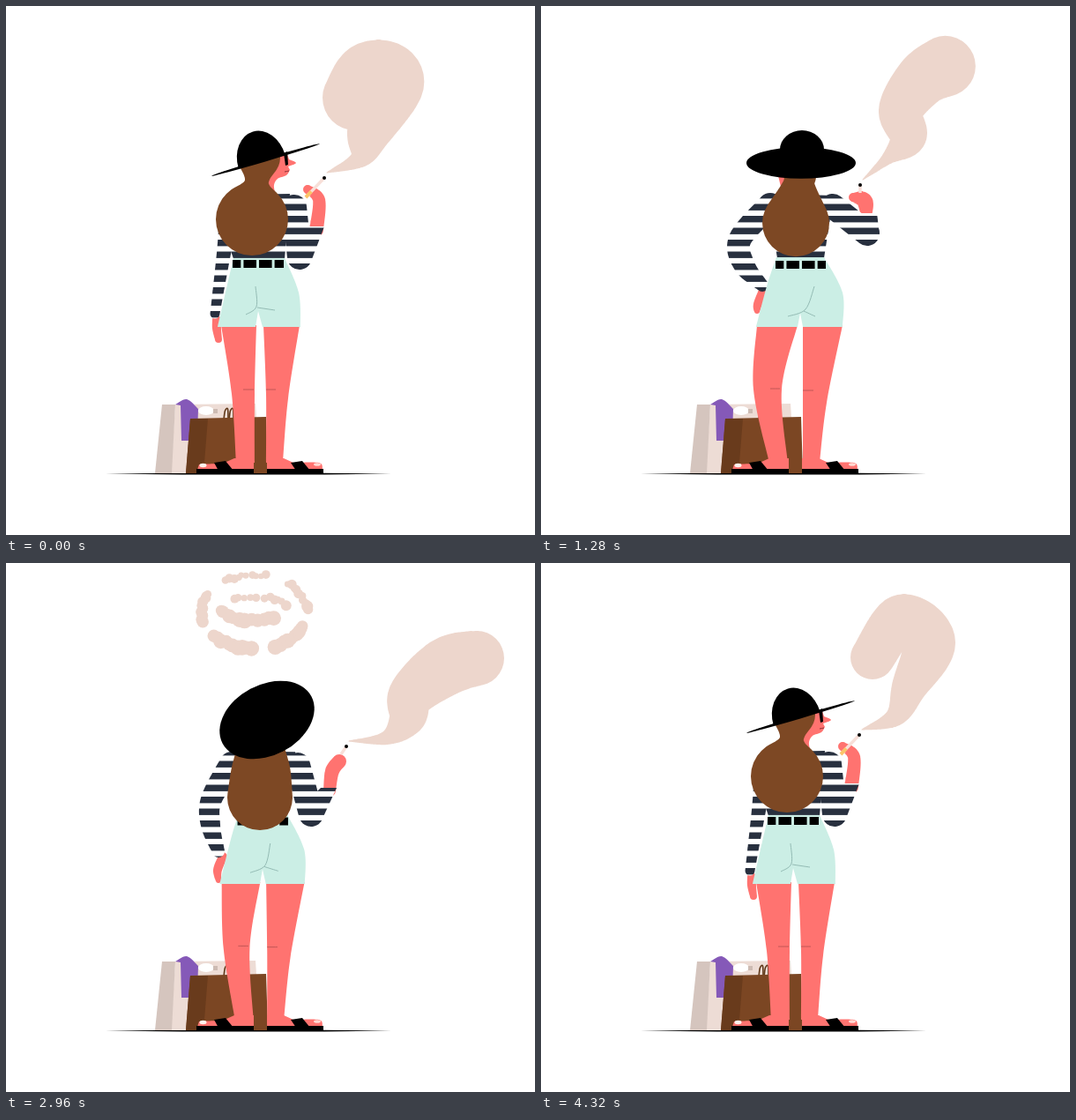
An HTML page with a canvas for the animation above (4400 ms loop, 600 px wide and 600 px high).

```html
<!DOCTYPE html>
<html lang="en">
<head>
<meta charset="utf-8">
<title>Woman smoking</title>
<style>
html, body { margin: 0; width: 100%; height: 100%; overflow: hidden; background: #fff; }
canvas { display: block; width: 600px; height: 600px; }
</style>
</head>
<body>
<canvas id="stage"></canvas>
<script>
const LOOP = 4400, STEP = 40;
const SKIN = '#ff7370', MINT = '#cbeee5', NAVY = '#28303f', HAIR = '#7d4824', SMOKE = '#edd6cc';

const dpr = window.devicePixelRatio || 1;
function setup(canvas) {
  canvas.width = canvas.height = 600 * dpr;
  const c = canvas.getContext('2d');
  c.scale(dpr, dpr);
  return c;
}
const g = setup(document.getElementById('stage'));
const cloth = setup(document.createElement('canvas'));

// "x y x y | x y" -> runs of points; a run is smooth, runs meet in corners
const parse = (s, dim = 2) => s.split('|').map(run => {
  const n = run.trim().split(/\s+/).map(Number);
  return Array.from({ length: n.length / dim }, (_, i) => n.slice(i * dim, (i + 1) * dim));
});
const mix = (a, b, u) => Array.isArray(a) ? a.map((v, i) => mix(v, b[i], u)) : a + (b - a) * u;
const poses = (o, dim) => Object.fromEntries(Object.entries(o).map(([k, s]) => [k, parse(s, dim)]));
// limbs, hair and smoke: one run of x, y, radius
const limb = o => poses(o, 3);
// A in profile, B from behind, C on the way back
const turn = (a, b) => {
  const p = poses({ A: a, B: b });
  p.C = mix(p.A, p.B, .62);
  return p;
};
const track = s => s.split(' ').map(k => ({ pose: k[0], t: +k.slice(1) }));
const smooth = u => u * u * (3 - 2 * u);
const linear = u => u;

function at(part, keys, t, ease = smooth) {
  const i = keys.findIndex(k => k.t > t);
  const a = keys[i - 1], b = keys[i];
  return mix(part[a.pose], part[b.pose], ease((t - a.t) / (b.t - a.t)));
}

// D inhales, E breathes out with the head back
const body = track('A0 A40 B560 B2560 C2960 A3320 A4400');
const head = track('A0 A40 B560 B1240 D1840 D1880 E2240 E2560 C2960 A3320 A4400');
const reach = track('A0 A40 B560 B640 D1080 D1880 E2240 E2560 C2960 A3320 A4400');
const drift = track('A0 S720 S1160 D1840 E2320 C2960 C3320 S3680 G4320 A4400');

const legL = turn('244 362 256 440 261 518 | 282 518 282 440 284 362', '245 362 241 435 259 518 | 280 518 273 435 291 362');
const legR = turn('292 362 295 440 295 518 | 314 518 320 445 333 362', '297 362 297 440 297 518 | 316 518 324 450 342 362');
const shorts = turn('258 286 254 303 240 364 | 283 364 | 286 346 | 291 364 | 334 364 332 325 316 286',
                    '267 285 256 318 244 364 | 291 364 | 294 348 | 297 364 | 342 364 342 325 321 285');
const crease = turn('283 318 284 341 272 350 | 285 342 305 345', '310 318 300 344 280 352 | 298 346 311 352');
const knees = turn('269 435 281 435 | 295 435 306 435', '260 434 271 434 | 297 436 309 436');
const belt = turn('257 292.5 315 292.5', '266 293.5 323 293.5');
const torso = turn('262 214 | 322 213 | 316 287 | 258 287 | 250 262', '256 213 | 332 215 | 321 286 | 268 286 | 262 250');
const faceShift = turn('0 0', '-24 -8');
const crown = turn('290 176 27.5 35', '296 163 25 22');

const armL = limb({
  A: '256 228 14 249 268 9 243 308 7 237 349 5.5',
  B: '260 226 14 226 264 13 230 293 12 251 317 7',
  C: '256 228 14 233 268 12 232 297 11 241 327 7' });
const handL = limb({
  A: '239 356 5 239 366 5 241 378 4',
  B: '254 318 5 246 338 5 245 346 3',
  C: '246 333 5 240 348 5 241 360 3' });
// shoulder, elbow, wrist
const armR = poses({
  A: '327 228 333 285 352 250',
  B: '333 230 341 285 358 252',
  C: '331 229 346 285 366 255',
  D: '331 227 370 258 372 235',
  E: '334 232 349 285 374 264' });
const handR = limb({
  A: '352 254 8 355 220 7 342 208 5',
  B: '358 255 7 360 218 8 349 210 5',
  C: '367 258 7 370 236 8 378 225 8',
  D: '369 239 6 367 221 9 354 217 5',
  E: '377 266 6 388 244 8 411 238 6' });
const cigarette = poses({ A: '340 217 361 195', B: '346 216 365 197', C: '380 217 386 208', D: '362 212 362 203', E: '414 236 425 235' });

const hair = limb({
  A: '287 172 24 284 203 14 279 242 41',
  B: '294 192 18 292 207 19 289 246 38',
  C: '289 220 29 289 240 34 288 266 37',
  D: '291 212 29 291 232 34 291 264 36',
  E: '295 232 31 294 260 36 293 283 37' });
// x, y, rx, ry, tilt
const brim = {
  A: [294.5, 174.5, 64, 1.7, -16.5], B: [295, 178, 62, 17.5, 0], C: [296, 178, 57, 40, -28],
  D: [294.5, 176.5, 61, 38, 1], E: [294, 177, 62, 52, 0] };

// spine from stem to head, starting beyond the cigarette tip
const smoke = limb({
  A: '402 172 11 412 142 25 436 88 38 414 80 40 396 104 37',
  C: '432 198 8 455 176 20 460 149 26 500 117 33 534 108 31',
  D: '390 190 5 404 170 13 413 128 30 414 96 39 414 74 41',
  E: '448 209 6 478 185 18 482 150 23 482 112 36 481 98 42',
  G: '402 174 11 418 140 20 440 90 30 408 63 27 376 107 25',
  S: '395 168 8 419 144 22 407 116 24 437 80 29 468 67 33' });

const puff = limb({
  S: '300 150 2 300 149 2 300 148 2',
  M: '300 126 7 290 103 9 286 82 13',
  L: '295 105 12 282 72 38 280 58 48' });
const puffTrack = track('S2160 M2320 L2720');

// the puff breaks into two broken rings of small bubbles
let seed = 7;
const random = () => (seed = seed * 16807 % 2147483647) / 2147483647;
const bubbles = [];
for (const [y, rx, ry, count, gaps] of [[54, 60, 42, 70, 5], [50, 38, 13, 34, 2]]) {
  for (let i = 0; i < count; i++) {
    const a = i / count * Math.PI * 2;
    if (Math.sin(a * gaps + 1) > .6) continue;
    bubbles.push([280 + rx * Math.cos(a) + random() * 3, y + ry * Math.sin(a) + random() * 3, 5 + 2 * Math.sin(a) + random() * 2]);
  }
}
const fade = { A: [2.2, .86], B: [1, 1], C: [0, 1.14] };
const fadeTrack = track('A2720 B2960 C3480');

function trace(c, runs, closed) {
  c.beginPath();
  runs.forEach((p, r) => {
    const n = p.length;
    const pt = i => closed ? p[(i + n) % n] : p[Math.max(0, Math.min(n - 1, i))];
    r ? c.lineTo(...p[0]) : c.moveTo(...p[0]);
    for (let i = 0; i < (closed ? n : n - 1); i++) {
      const [a, b, d, e] = [pt(i - 1), pt(i), pt(i + 1), pt(i + 2)];
      c.bezierCurveTo(b[0] + (d[0] - a[0]) / 6, b[1] + (d[1] - a[1]) / 6,
        d[0] - (e[0] - b[0]) / 6, d[1] - (e[1] - b[1]) / 6, ...d);
    }
  });
}
function fill(runs, color, closed = false, c = g) {
  trace(c, runs, closed);
  c.fillStyle = color;
  c.fill();
}
const poly = (s, color, c = g) => fill(parse(s).flat().map(p => [p]), color, false, c);
function line(pts, color, width) {
  trace(g, [pts]);
  g.strokeStyle = color;
  g.lineWidth = width;
  g.stroke();
}
function oval(x, y, rx, ry, color, tilt = 0, from = 0) {
  g.beginPath();
  g.ellipse(x, y, rx, ry, tilt * Math.PI / 180, from, Math.PI * 2);
  g.fillStyle = color;
  g.fill();
}
// a circle of changing radius swept along a smooth spine
function sweep([spine], color, c = g) {
  const last = spine.length - 1, fine = 40;
  c.beginPath();
  for (let k = 0; k <= last * fine; k++) {
    const i = Math.min(Math.floor(k / fine), last - 1), u = k / fine - i;
    const p = [-1, 0, 1, 2].map(o => spine[Math.max(0, Math.min(last, i + o))]);
    const [x, y, r] = [0, 1, 2].map(j => {
      const [a, b, d, e] = p.map(v => v[j]);
      return b + u / 2 * (d - a + u * (2 * a - 5 * b + 4 * d - e + u * (3 * (b - d) + e - a)));
    });
    const size = Math.max(r, 0);
    c.moveTo(x + size, y);
    c.arc(x, y, size, 0, Math.PI * 2);
  }
  c.fillStyle = color;
  c.fill();
}

function drawBags() {
  poly('113 530.6 200 529.8 360 529.8 437 530.6 360 531.4 200 531.4', '#000');
  poly('192 452 283 451 288 530 187 530', '#eddcd5');
  poly('177 452 192 452 188 530 169 530', '#d5c5be');
  fill(parse('192 452 205 446 218 457 | 217 488 | 213 493 199 493 | 198 453'), '#8559b8');
  oval(227, 459, 9, 5, '#fff');
  poly('235 457 240 457 240 462 235 462', '#cdbbb3');
  for (const x of [247, 253]) line([[x, 469], [x + 1.5, 459], [x + 4.5, 457], [x + 5, 469]], '#5f3718', 1.6);
  poly('209 468 295 466 297 530 204 530', '#7b4623');
  poly('209 468 229 468 224 530 204 530', '#693b1c');
}

function drawLegs(t) {
  fill(at(legL, body, t), SKIN);
  fill(at(legR, body, t), SKIN);
  for (const k of at(knees, body, t)) line(k, '#b04f4e', .8);
  fill(parse('259 513 | 281 513 | 281 526 | 217 526 | 219 520 238 519 250 517'), SKIN);
  fill(parse('296 513 | 315 513 | 326 518 355 518 359 526 | 296 526'), SKIN);
  oval(223.5, 521, 4, 2.2, '#fff4ee');
  oval(353, 520, 4, 1.8, '#ffd9d2');
  poly('236 518 249 516 258 527 241 527', '#000');
  poly('323 518 336 516 345 527 329 527', '#000');
  g.fillRect(216, 525, 65, 6);
  g.fillRect(296, 525, 64, 6);
}

function drawShorts(t) {
  fill(at(shorts, body, t), MINT);
  for (const k of at(crease, body, t)) line(k, '#8db5ae', .9);
  g.setLineDash([14.5, 3]);
  g.lineDashOffset = 5;
  line(at(belt, body, t)[0], '#000', 9);
  g.setLineDash([]);
}

function drawShirt(t) {
  const c = cloth;
  c.globalCompositeOperation = 'source-over';
  c.clearRect(0, 0, 600, 600);
  sweep(at(armL, body, t), '#fff', c);
  fill(at(torso, body, t), '#fff', false, c);
  const [s, e, w] = at(armR, reach, t)[0];
  c.strokeStyle = '#fff';
  c.lineWidth = 28;
  c.lineCap = 'round';
  c.beginPath();
  c.moveTo(...s);
  c.lineTo(...e);
  c.stroke();
  // forearm narrows to a level cuff
  const d = Math.hypot(w[0] - e[0], w[1] - e[1]);
  const nx = (e[1] - w[1]) / d * 14, ny = (w[0] - e[0]) / d * 14;
  fill([[[e[0] + nx, e[1] + ny]], [[w[0] + 9, w[1]]], [[w[0] - 9, w[1]]], [[e[0] - nx, e[1] - ny]]], '#fff', false, c);
  c.globalCompositeOperation = 'source-atop';
  c.fillStyle = NAVY;
  for (let y = 211; y < 360; y += 13.5) c.fillRect(190, y, 220, 7.4);
  g.drawImage(c.canvas, 0, 0, 600, 600);
}

function drawHead(t) {
  const [dx, dy] = at(faceShift, body, t)[0][0];
  g.save();
  g.translate(dx, dy);
  fill(parse('300 168 | 319 168 | 321 174 329 178 320 182 | 322 186 318 192 308 196 304 203 305 211 | 296 213 | 288 180'), SKIN);
  line([[316, 188], [321, 187]], '#8c2f33', 1);
  g.restore();

  sweep(at(hair, head, t), HAIR);

  g.save();
  g.translate(dx, dy);
  poly('315 167 319 165 320 180 317 181', '#000');
  g.restore();

  const [x, y, rx, ry, tilt] = at(brim, head, t);
  oval(x, y, rx, ry, '#000', tilt);
  oval(...at(crown, body, t)[0].flat(), '#000', tilt, Math.PI);
}

function drawCigarette([a, b]) {
  line([a, b], '#f8dfd8', 3.4);
  if (Math.hypot(b[0] - a[0], b[1] - a[1]) > 18) line([a, mix(a, b, .3)], '#fbc469', 4);
  oval(...b, 2, 2, '#000');
}

function drawSmoke(t, [x, y]) {
  const [spine] = at(smoke, drift, t, linear);
  sweep([[[x + 3, y - 6, .6], ...spine]], SMOKE);
}

function drawPuff(t) {
  if (t >= 2160 && t < 2720) sweep(at(puff, puffTrack, t, linear), SMOKE);
  if (t >= 2720 && t < 3480) {
    const [size, spread] = at(fade, fadeTrack, t, linear);
    for (const [x, y, r] of bubbles)
      oval(280 + (x - 280) * spread, 58 + (y - 58) * spread, r * size, r * size, SMOKE);
  }
}

function draw(t) {
  g.fillStyle = '#fff';
  g.fillRect(0, 0, 600, 600);
  drawBags();
  drawLegs(t);
  sweep(at(handL, body, t), SKIN);
  sweep(at(handR, reach, t), SKIN);
  drawShirt(t);
  drawShorts(t);
  drawPuff(t);
  const [stick] = at(cigarette, reach, t);
  drawCigarette(stick);
  drawSmoke(t, stick[1]);
  drawHead(t);
}

const start = performance.now();
function tick() {
  const t = (performance.now() - start) % LOOP;
  draw(Math.floor(t / STEP) * STEP);
  requestAnimationFrame(tick);
}
tick();
</script>
</body>
</html>
```
